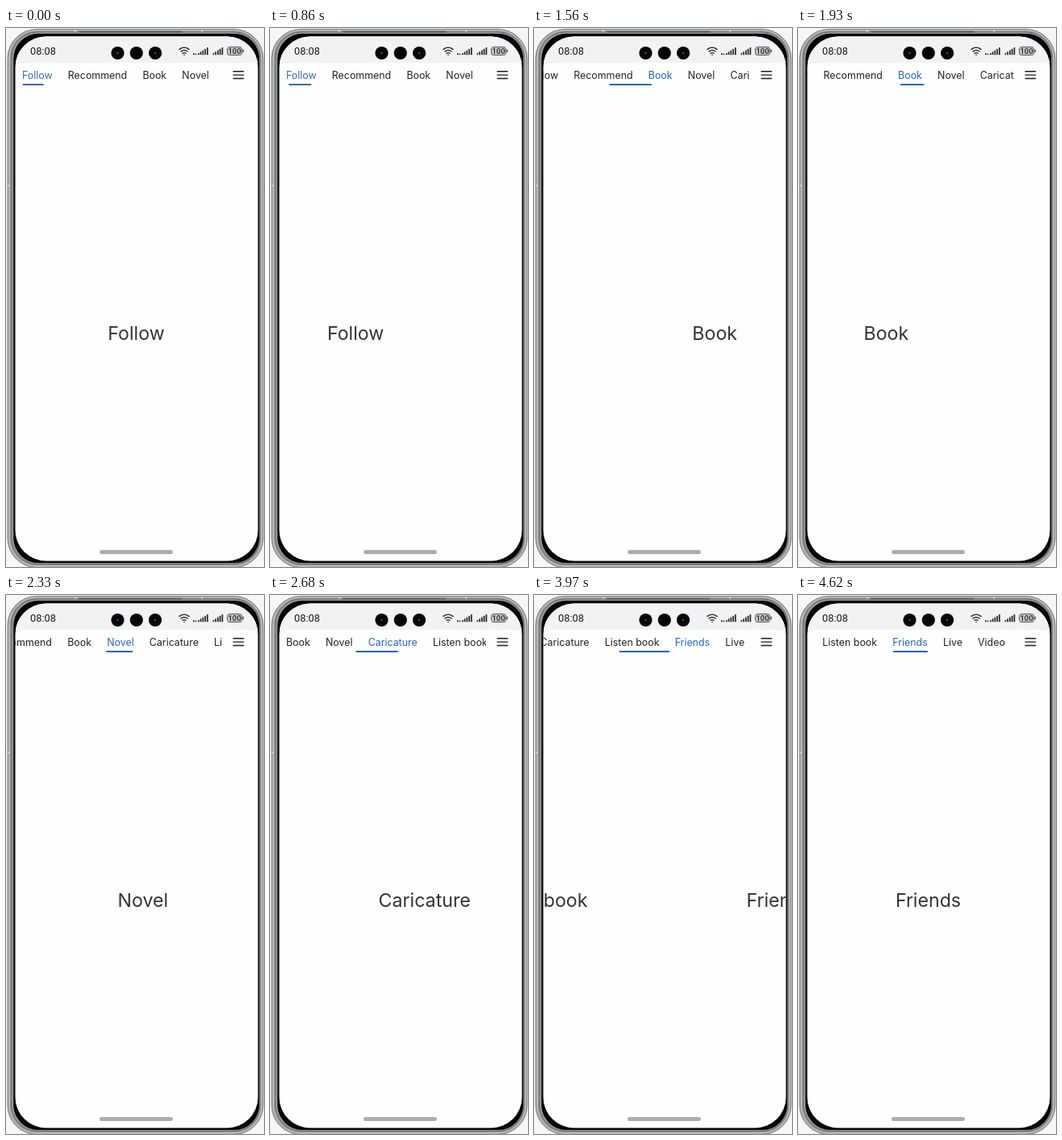
Recreate the animation shown at these times as an HTML page. Size 320 by 667 pixels, loop 4.7 s.

```html
<!DOCTYPE html>
<html lang="en">
<head>
<meta charset="utf-8">
<title>Scrolling tab bar</title>
<style>
  html, body { margin: 0; width: 100%; height: 100%; overflow: hidden; background: #f6f6f6; }
  svg { display: block; width: 100vw; height: 100vh; }
  text { font-family: Inter, "Noto Sans", sans-serif; }
  .tab { font-size: 12.4px; }
  .page { font-size: 23.2px; fill: #333; text-anchor: middle; }
  .clock { font: 400 12.8px Roboto, sans-serif; fill: #18181a; }
  .level { font: 500 9.4px Roboto, sans-serif; fill: #1c1c1c; text-anchor: middle; }
</style>
</head>
<body>
<svg viewBox="0 0 320 667" preserveAspectRatio="none">
  <defs>
    <clipPath id="screen"><rect x="11.5" y="10.5" width="301" height="649" rx="38"/></clipPath>
    <clipPath id="bar"><rect x="11" y="43" width="257" height="32"/></clipPath>
  </defs>

  <!-- phone body -->
  <rect x="2" y="1.5" width="317" height="666" rx="36" fill="#a4a8a6" stroke="#7d817f"/>
  <rect x="4.3" y="3" width="312.6" height="662.6" rx="34" fill="#8e9290" stroke="#c9cccA"/>
  <rect x="7" y="5" width="308" height="658.4" rx="32" fill="#9da19f" stroke="#646866"/>
  <rect x="9.2" y="7" width="305" height="655" rx="31" fill="#060606"/>
  <path d="M90 4.6H218" stroke="#565a58" stroke-width="1.6"/>
  <path d="M86 2v3M243 2v3M2 195h3" stroke="#d9dbda" stroke-width="1.5"/>
  <g clip-path="url(#screen)">
    <rect x="11" y="10" width="303" height="651" fill="#fefefe"/>
    <rect x="11" y="10" width="303" height="33" fill="#f1f2f4"/>
    <g id="pages"></g>
    <g clip-path="url(#bar)">
      <g id="tabs"></g>
      <rect id="line" y="69" height="2" rx=".6"/>
    </g>
    <rect x="116" y="646" width="91" height="5" rx="2.5" fill="#adadad"/>
  </g>

  <!-- status bar -->
  <text class="clock" x="30" y="33">08:08</text>
  <g id="cameras"></g>
  <g fill="none" stroke="#252527" stroke-width="1.4" stroke-linecap="round">
    <path d="M215 26.4q6-4.6 12 0M217 29q4-3 8 0M219 31.3q2-1.4 4 0"/>
    <path d="M221 33.2v.1" stroke-width="1.6"/>
  </g>
  <g id="signal" fill="#252527"></g>
  <rect x="274.5" y="23.5" width="18" height="10" rx="2.8" fill="#c9cbce" stroke="#55575a"/>
  <rect x="293.4" y="26.5" width="1.6" height="4" rx=".8" fill="#55575a"/>
  <text class="level" x="283.5" y="31.9">100</text>
  <path d="M281.5 53.7h13.5M281.5 58.1h13.5M281.5 62.5h13.5" stroke="#1c1c1c" stroke-width="1.4"/>
</svg>
<script>
const LOOP = 4700, STEP = 75, LEAD = 60;
const PITCH = 301, CENTER = 161.5;
const BAR_START = 20, BAR_MID = 139, GAP = 19.2;
const LABELS = ["Follow", "Recommend", "Book", "Novel", "Caricature", "Listen book", "Friends", "Live", "Video"];

const swipes = [
  { start: 860, rate: .013 },
  { start: 1400, rate: .014 },
  { start: 1930, rate: .0125 },
  { start: 2490, rate: .0185 },
  { start: 3050, rate: .027 },
  { start: 3820, rate: .0084 }
];
const SETTLED = 6.7;

const $ = id => document.getElementById(id);
const mix = (a, b, k) => a + (b - a) * k;
const clamp = k => Math.min(1, Math.max(0, k));
const smooth = k => k * k * (3 - 2 * k);

function add(parent, tag, attrs, label = "") {
  const el = document.createElementNS("http://www.w3.org/2000/svg", tag);
  for (const k in attrs) el.setAttribute(k, attrs[k]);
  el.textContent = label;
  return parent.appendChild(el);
}

// each tab starts a fixed gap after the previous label
let edge = BAR_START;
const tabs = LABELS.map((label, i) => {
  const x = edge;
  const el = add($("tabs"), "text", { class: "tab", x, y: 63 }, label);
  const width = el.getComputedTextLength();
  edge += width + GAP;
  add($("pages"), "text", { class: "page", x: CENTER + i * PITCH, y: 386 }, label);
  return {
    el, x: x + .7,
    line: i ? width - .6 : width * .69,
    scroll: Math.max(0, x + width / 2 - BAR_MID)
  };
});

for (let i = 0; i < 3; i++) {
  const cx = 138.5 + i * 23.3;
  add($("cameras"), "circle", { cx, cy: 31, r: 8.1, fill: "#070707" });
  if (i !== 1) add($("cameras"), "circle", { cx, cy: 31, r: 1.2, fill: "#4d5257" });
}

for (const x of [238, 256.5])
  for (let i = 0; i < 5; i++) {
    const height = 2.4 + i * 1.75;
    add($("signal"), "rect", { x: x + i * 2.75, y: 33.3 - height, width: 1.7, height, rx: .5 });
  }
add($("signal"), "path", { d: "M232.3 31h1.4v2.3h-1.4zM234.6 31.8h1.5v1.5h-1.5z" });

// index of the tab being left, and how far its spring has run
function phase(t) {
  const from = Math.max(0, swipes.filter(s => s.start <= t).length - 1);
  const { start, rate } = swipes[from];
  if (t < start) return [from, 0];
  const held = Math.floor((t - start) / STEP) * STEP;
  return [from, rate * (held + LEAD)];
}

function draw(t) {
  const [from, x] = phase(t);
  const page = x > SETTLED ? 1 : 1 - (1 + x) * Math.exp(-x);
  const bar = clamp((page - .177) / .823) ** 1.7;
  const line = smooth(clamp(x / 6.1));

  const a = tabs[from], b = tabs[from + 1];
  const active = page < .5 ? from : from + 1;
  const scroll = mix(a.scroll, b.scroll, bar);
  const blue = active ? "#2863c8" : "#4067ab";

  $("pages").setAttribute("transform", `translate(${-(from + page) * PITCH} 0)`);
  $("tabs").setAttribute("transform", `translate(${-scroll} 0)`);
  $("line").setAttribute("x", mix(a.x, b.x, line) - scroll);
  $("line").setAttribute("width", mix(a.line, b.line, line));
  $("line").setAttribute("fill", blue);
  tabs.forEach(({ el }, i) => el.setAttribute("fill", i === active ? blue : "#222"));
}

const start = performance.now();
function tick() {
  draw((performance.now() - start) % LOOP);
  requestAnimationFrame(tick);
}
draw(0);
requestAnimationFrame(tick);
</script>
</body>
</html>
```
